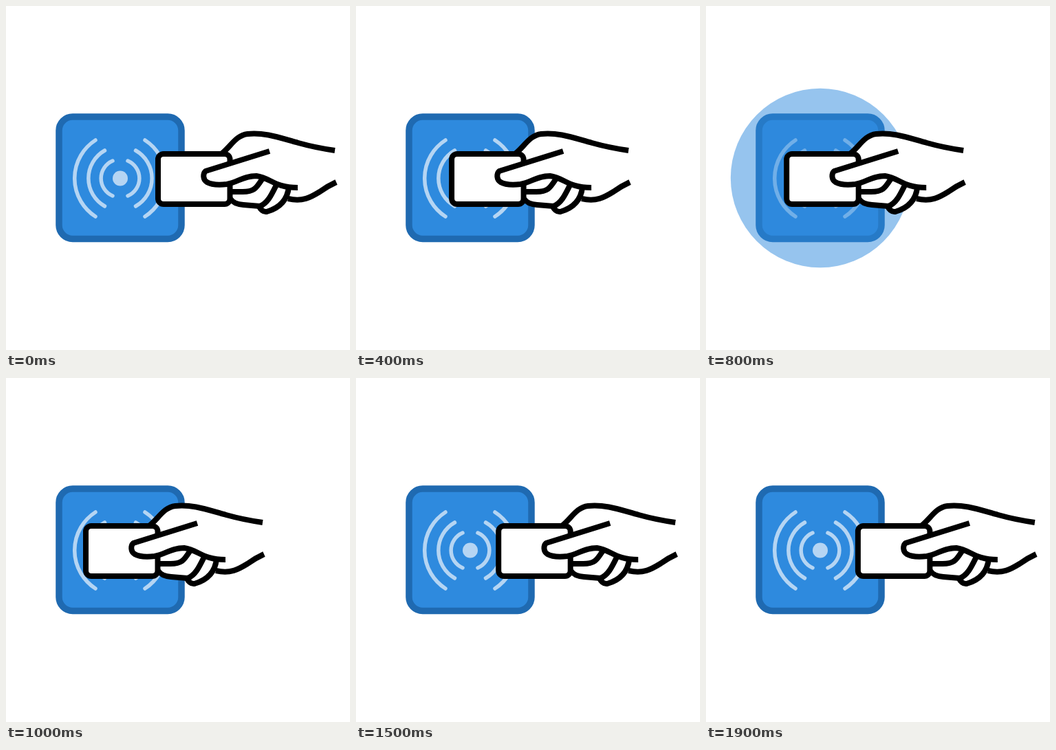
An HTML page for the animation above (2000 ms loop, 500 by 500 pixels).

```html
<!DOCTYPE html>
<html lang="en">
<head>
<meta charset="utf-8">
<title>Tap to pay</title>
<style>
  html, body { margin: 0; width: 100%; height: 100%; overflow: hidden; background: #fff; }
  svg { display: block; width: 100%; height: 100%; }
  .waves { fill: none; stroke: #b5d5f3; stroke-width: 5.5; stroke-linecap: round; }
  .line { fill: none; stroke: #000; stroke-width: 8; stroke-linejoin: round; }
  .white { fill: #fff; }
</style>
</head>
<body>
<svg viewBox="0 0 500 500">
  <defs>
    <filter id="smear" filterUnits="userSpaceOnUse" x="190" y="160" width="310" height="170"
            color-interpolation-filters="sRGB">
      <feGaussianBlur id="blur" stdDeviation="0 0"/>
    </filter>
  </defs>

  <rect x="77" y="161" width="178" height="177.500" rx="20" fill="#2e8ade" stroke="#1f6ab1" stroke-width="9.500"/>
  <g class="waves">
    <path d="M130 195A66 66 0 0 0 130 306M202 195A66 66 0 0 1 202 306"/>
    <path d="M143.500 210A46.500 46.500 0 0 0 143.500 291M188.500 210A46.500 46.500 0 0 1 188.500 291"/>
    <path d="M155 225A27.700 27.700 0 0 0 155 276M177 225A27.700 27.700 0 0 1 177 276"/>
  </g>
  <circle cx="166" cy="250.500" r="11" fill="#b5d5f3"/>
  <circle id="pulse" cx="166" cy="250" r="0" fill="#2e8ade"/>

  <g id="hand">
    <path class="white" d="M313 214C327 203 335 188 350 186C375 183 402 193 425 199Q450 206 478 210L480 257C458 268 448 282 425 282L411 280Q398 297 378 299L369 291L345 289Q330 286 328 276L318 240Z"/>
    <g class="line">
      <path d="M324 270H344C362 270 364 264 374 249"/>
      <path d="M326 280Q331 288 345 289L369 291C381 286 386 274 394 258"/>
      <path d="M367 290Q372 300 379 299C396 294 409 283 411 263"/>
      <path d="M410 280C431 285 443 278 456 270Q467 262 480 256"/>
    </g>
    <rect class="line" style="fill:#fff" x="221" y="215" width="104.500" height="73" rx="8"/>
    <path class="white" d="M383 211L291 240Q284 247 290 255Q299 260 320 259C337 256 345 247 364 247C385 250 388 264 424 264L440 220Z"/>
    <g class="line">
      <path d="M313 215C327 204 334 188 351 186C377 183 402 193 425 199Q450 206 478 210"/>
      <path d="M383 211L290 240C286 244 286 252 292 256C299 260 312 260 321 259C337 256 345 247 364 247C385 250 390 264 424 264"/>
    </g>
  </g>
</svg>
<script>
  const LOOP = 2000, STEP = 100, LEG = 950, REACH = 105;
  const hand = document.getElementById('hand');
  const blur = document.getElementById('blur');
  const pulse = document.getElementById('pulse');
  const clamp = v => Math.min(1, Math.max(0, v));
  const smooth = v => v * v * (3 - 2 * v);

  // Quick start, long settle: cubic-bezier(.2, 0, .1, 1)
  function glide(v) {
    const x = clamp(v);
    let lo = 0, hi = 1;
    for (let i = 0; i < 24; i++) {
      const s = (lo + hi) / 2, q = 1 - s;
      if (.6 * s * q * q + .3 * s * s * q + s ** 3 < x) lo = s; else hi = s;
    }
    return smooth(lo);
  }

  const offset = t => -REACH * (glide(t / LEG) - glide((t - 1000) / LEG));

  function draw(t) {
    const x = offset(t);
    const speed = t ? Math.abs(offset(t + 20) - offset(t - 20)) / 40 : 0;
    const smear = speed * 4.5;
    hand.setAttribute('transform', `translate(${x.toFixed(2)} 0)`);
    blur.setAttribute('stdDeviation', `${smear.toFixed(2)} 0`);
    if (smear > .35) hand.setAttribute('filter', 'url(#smear)');
    else hand.removeAttribute('filter');

    pulse.setAttribute('r', 160 * smooth(clamp((t - 275) / 725)));
    pulse.setAttribute('opacity', clamp((1000 - t) / 400));
  }

  const start = performance.now();
  function tick() {
    const t = (performance.now() - start) % LOOP;
    draw(Math.floor(t / STEP) * STEP);
    requestAnimationFrame(tick);
  }
  draw(0);
  requestAnimationFrame(tick);
</script>
</body>
</html>
```
